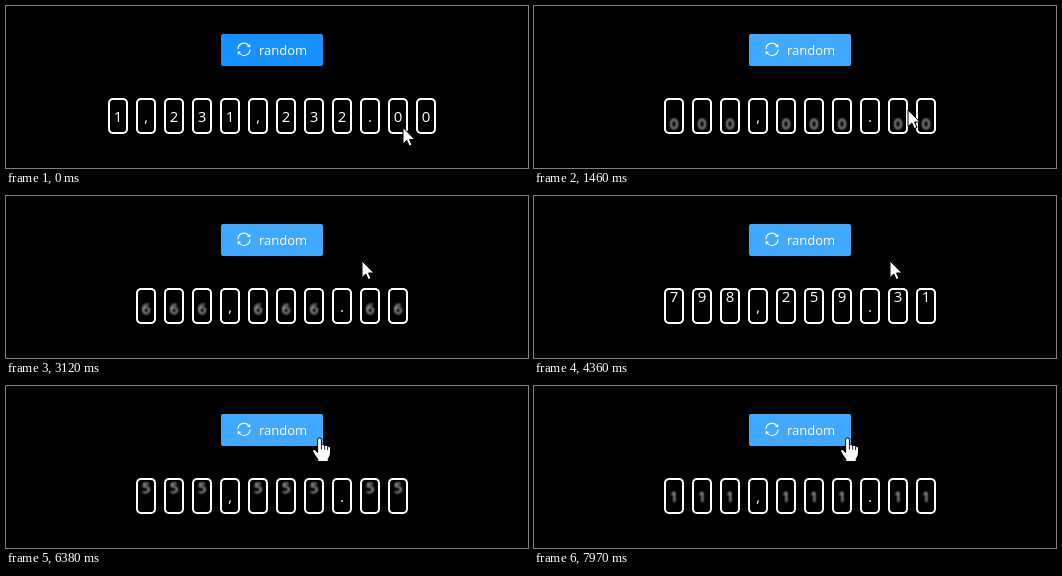
These frames come from a looping animation (522x162 px, 8000 ms). An HTML page:

```html
<!DOCTYPE html>
<html lang="en">
<head>
<meta charset="utf-8">
<title>Random number reels</title>
<style>
  html, body { margin: 0; width: 100%; height: 100%; overflow: hidden; background: #000; }
  svg { display: block; width: 522px; height: 162px; }
  text { font-family: "Open Sans", "Noto Sans", sans-serif; fill: #fff; }
  #cells text, #symbols text { font-size: 15px; text-anchor: middle; }
  #label { font-size: 13px; }
  .frame { fill: none; stroke: #fff; stroke-width: 2; }
  .icon { fill: none; stroke: #fff; stroke-width: 1.1; stroke-linecap: round; }
</style>
</head>
<body>
<svg viewBox="0 0 522 162">
  <defs>
    <clipPath id="window"><rect x="100" y="94" width="334" height="32"/></clipPath>
    <filter id="blur" filterUnits="userSpaceOnUse" x="90" y="60" width="350" height="100">
      <feGaussianBlur stdDeviation="1"/>
    </filter>
  </defs>
  <rect width="522" height="162"/>

  <rect id="wave" fill="none" stroke="#1890ff"/>
  <rect id="button" x="215" y="28" width="102" height="32" rx="2"/>
  <g id="sync" transform="translate(238 43.3)">
    <g id="half">
      <path class="icon" d="M-6 -.6A6 6 0 0 1 5 -3.4"/>
      <path d="M6.4 -5.4L6.2 -1.7L2.9 -2.8Z" fill="#fff"/>
    </g>
    <use href="#half" transform="rotate(180)"/>
  </g>
  <text id="label" x="253" y="49">random</text>

  <g id="frames"></g>
  <g clip-path="url(#window)"><g id="cells"></g></g>
  <g id="symbols"></g>

  <g id="cursor">
    <path id="arrow" d="M0 0V16.5L3.8 13L6.3 18.6L9 17.4L6.5 12H11.8Z"
          fill="#fff" stroke="#000" stroke-width="1"/>
    <g id="hand">
      <path d="M-1.9 1.8a1.9 1.9 0 0 1 3.8 0V7q1.8-1.2 3.2.5q1.8-.9 3 .8q2.6-.5 2.9 1.9V15q0 3-2.2 5.5V23.5H-1.7V21Q-4.5 18-6.6 13.8q-.8-2 .9-2.3q1.6 0 3.8 3Z"
            fill="#fff" stroke="#000" stroke-width="1"/>
      <path d="M1.9 7v4.5M5.1 7.8v3.8M8.1 8.6v3.4" stroke="#000" stroke-width=".9"/>
    </g>
  </g>
</svg>
<script>
const LOOP = 8000, CELLS = 12, PITCH = 36, BASELINE = 116;
const BEFORE = "1,231,232.00", AFTER = " 809,360.42 ";
const SPINS = [{ start: 452, rate: 9.72 }, { start: 5851, rate: 9.91 }];
const SLOWING = { from: 3452, to: 4960, digits: 5, power: 2.1 };

// time, x, y of the pointer tip
const PATH = [
  [0, 397, 121.5], [60, 397, 121.5], [380, 303, 48], [860, 303, 48],
  [1460, 374, 104], [1700, 374, 104], [2450, 356, 66], [2600, 356, 65],
  [5200, 356, 65], [5570, 315.5, 53], [5650, 313.5, 52], [LOOP, 313.5, 52]
];

const $ = id => document.getElementById(id);
const clamp = v => Math.min(1, Math.max(0, v));
const mix = (a, b, p) => a + (b - a) * p;

function add(parent, tag, attrs) {
  const node = document.createElementNS("http://www.w3.org/2000/svg", tag);
  setAll(node, attrs);
  return parent.appendChild(node);
}
function setAll(node, attrs) {
  for (const name in attrs) node.setAttribute(name, attrs[name]);
}

const cells = Array.from({ length: CELLS }, (_, i) => {
  const x = 102 + 28 * i, middle = x + 10;
  return {
    frame: add($("frames"), "rect", { class: "frame", x: x + 1, y: 93, width: 18, height: 34, rx: 4 }),
    digits: [0, 1].map(() => add($("cells"), "text", { x: middle })),
    symbol: add($("symbols"), "text", { x: middle, y: BASELINE })
  };
});

// Position of a reel in digits; the whole part is the digit shown.
function reelPosition(t, target) {
  const spin = activeSpin(t);
  if (spin) return (t - spin.start) * spin.rate / 1000;
  if (t < SPINS[0].start) return target;
  const left = 1 - clamp((t - SLOWING.from) / (SLOWING.to - SLOWING.from));
  return target + 10 - SLOWING.digits * left ** SLOWING.power;
}
function activeSpin(t) {
  if (t >= SPINS[1].start) return SPINS[1];
  return t >= SPINS[0].start && t < SLOWING.from ? SPINS[0] : null;
}

function drawReels(t) {
  const value = t < SPINS[0].start ? BEFORE : AFTER;
  cells.forEach((cell, i) => {
    const char = value[i], isDigit = /\d/.test(char);
    cell.frame.style.display = char === " " ? "none" : "";
    cell.symbol.textContent = isDigit ? "" : char;
    const position = isDigit ? reelPosition(t, +char) : 0;
    const whole = Math.floor(position);
    cell.digits.forEach((node, step) => {
      node.textContent = isDigit ? (whole + step) % 10 : "";
      node.setAttribute("y", BASELINE + (whole + step - position) * PITCH);
    });
  });
  if (activeSpin(t)) $("cells").setAttribute("filter", "url(#blur)");
  else $("cells").removeAttribute("filter");
}

function drawButton(t) {
  const hover = clamp((t - 300) / 200);
  const red = mix(24, 64, hover), green = mix(144, 169, hover);
  $("button").setAttribute("fill", `rgb(${red},${green},255)`);

  const click = SPINS.map(s => t - s.start).find(d => d >= 0 && d < 400);
  const p = click === undefined ? 1 : click / 400;
  const spread = 6 * (1 - (1 - p) ** 2);
  setAll($("wave"), {
    x: 215 - spread / 2, y: 28 - spread / 2,
    width: 102 + spread, height: 32 + spread, rx: 2 + spread / 2,
    "stroke-width": spread, opacity: 0.2 * (1 - p) ** 4
  });
}

function drawCursor(t) {
  const next = Math.max(1, PATH.findIndex(point => point[0] > t));
  const [t0, x0, y0] = PATH[next - 1], [t1, x1, y1] = PATH[next];
  const p = (t - t0) / (t1 - t0), eased = p * p * (3 - 2 * p);
  const x = mix(x0, x1, eased), y = mix(y0, y1, eased);
  const over = x >= 215 && x < 317 && y >= 28 && y < 60;
  $("cursor").setAttribute("transform", `translate(${x} ${y})`);
  $("arrow").style.display = over ? "none" : "";
  $("hand").style.display = over ? "" : "none";
}

const began = performance.now();
function draw() {
  const t = (performance.now() - began) % LOOP;
  drawReels(t);
  drawButton(t);
  drawCursor(t);
  requestAnimationFrame(draw);
}
draw();
</script>
</body>
</html>
```
